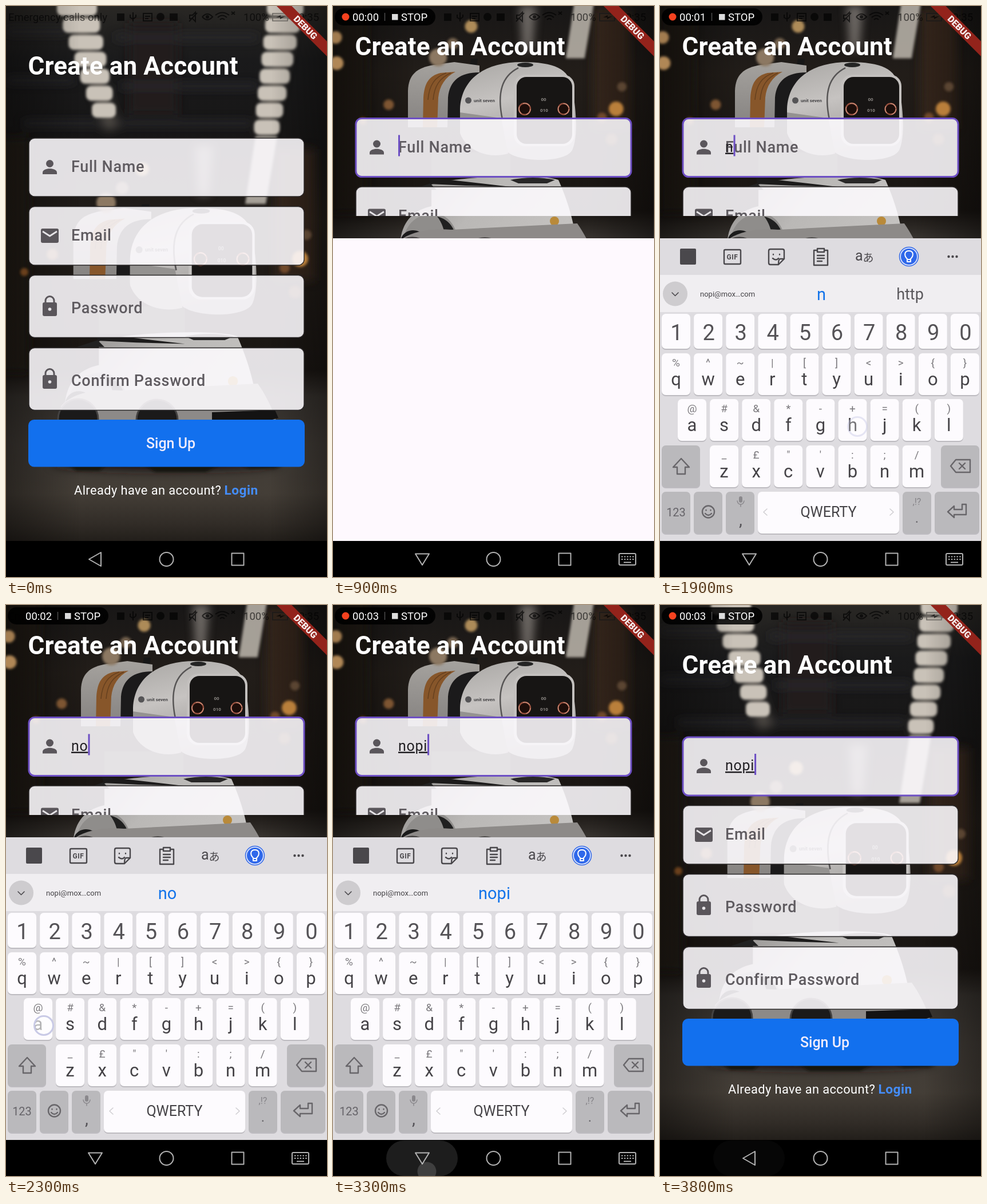
An HTML page that plays this animation: 561x998 px, repeating every 4 s.

```html
<!DOCTYPE html>
<html lang="en">
<head>
<meta charset="utf-8">
<title>Sign up screen</title>
<style>
html, body { margin: 0; width: 100%; height: 100%; overflow: hidden; background: #000; }
svg { display: block; width: 100vw; height: 100vh; font-family: Roboto, sans-serif; }
.line { fill: none; stroke: #4a484c; stroke-width: 2.4; stroke-linecap: round; stroke-linejoin: round; }
.nav { fill: none; stroke: #b2b2b2; stroke-width: 2; stroke-linejoin: round; }
.label { font-size: 27px; font-weight: 500; letter-spacing: .7px; fill: #5f5b60; }
.mid { text-anchor: middle; }
</style>
</head>
<body>
<svg viewBox="0 0 561 998" preserveAspectRatio="none">
<defs>
  <linearGradient id="room" x2="0" y2="1">
    <stop offset="0" stop-color="#292724"/><stop offset=".1" stop-color="#1a1a1b"/>
    <stop offset=".25" stop-color="#171616"/><stop offset=".4" stop-color="#221d19"/>
    <stop offset=".68" stop-color="#191512"/><stop offset=".73" stop-color="#35312d"/>
    <stop offset=".82" stop-color="#403b36"/><stop offset=".91" stop-color="#443e37"/>
    <stop offset=".97" stop-color="#302b26"/><stop offset="1" stop-color="#221e1a"/>
  </linearGradient>
  <linearGradient id="edges">
    <stop offset="0" stop-color="#050403" stop-opacity=".5"/><stop offset=".25" stop-color="#050403" stop-opacity="0"/>
    <stop offset=".8" stop-color="#050403" stop-opacity="0"/><stop offset="1" stop-color="#050403" stop-opacity=".45"/>
  </linearGradient>
  <linearGradient id="shell" x2=".3" y2="1">
    <stop offset="0" stop-color="#a9a7a4"/><stop offset=".45" stop-color="#c6c3c1"/><stop offset="1" stop-color="#989694"/>
  </linearGradient>
  <linearGradient id="torso" x2="1" y2=".4">
    <stop offset="0" stop-color="#8d8b89"/><stop offset=".5" stop-color="#bab8b6"/><stop offset="1" stop-color="#c4c2c0"/>
  </linearGradient>
  <linearGradient id="back" x2="0" y2="1">
    <stop offset="0" stop-color="#a5a29e"/><stop offset="1" stop-color="#858280"/>
  </linearGradient>
  <filter id="soft" x="-40%" y="-40%" width="180%" height="180%"><feGaussianBlur stdDeviation="2.2"/></filter>
  <filter id="haze" x="-60%" y="-60%" width="220%" height="220%"><feGaussianBlur stdDeviation="8"/></filter>
  <clipPath id="page"><rect id="pageBox" width="561" height="935"/></clipPath>
  <clipPath id="scroll"><rect id="scrollBox" width="561" height="935"/></clipPath>
</defs>
<rect width="561" height="998" fill="#fef9fe"/>

<g clip-path="url(#page)">
  <g id="photo">
    <rect x="-25" width="611" height="936" fill="url(#room)"/>
    <g filter="url(#haze)">
      <path d="M-25 230H40V640H-25Z" fill="#241a13"/>
      <path d="M470 250H540V480H470Z" fill="#34271e"/>
      <path d="M215 30H300V190H215Z" fill="#201c1b"/>
      <path d="M0 45H110M190 55H440M0 130H120M200 140H440M30 205H430" stroke="#2b2c2e" stroke-width="9"/>
      <path d="M120 0L185 215M500 0L450 230" stroke="#4b4742" stroke-width="24"/>
      <path d="M330 245H362L354 330H336Z" fill="#a39d96" opacity=".6"/>
      <ellipse cx="280" cy="800" rx="200" ry="12" fill="#1b1815"/>
    </g>
    <g id="lamps" filter="url(#soft)"></g>
    <rect x="-25" width="611" height="936" fill="url(#edges)"/>
    <g transform="translate(-25 246.2) scale(1.0893)">
      <path d="M236 118L241 92L253 92L250 118Z" fill="#171717"/>
      <path d="M131 148C132 120 146 108 176 103L212 98L256 104V150L204 212H131Z" fill="url(#back)"/>
      <path d="M158 160C160 134 168 122 188 117L214 115C196 124 186 140 184 160L182 212H157Z" fill="#87562a"/>
      <path d="M166 164C168 138 178 124 198 117M175 164C177 140 186 126 206 117" fill="none" stroke="#65401f" stroke-width="1.500"/>
      <path d="M201 160C204 130 222 116 256 116L236 150L226 212H200Z" fill="#1b1a1b"/>
      <path d="M172 256H310V300H172Z" fill="#2a2827"/>
      <path d="M222 180C224 130 262 98 330 98C388 98 412 110 418 142C426 186 428 230 418 252C406 274 330 274 306 256L222 220Z" fill="url(#shell)"/>
      <path d="M222 186L294 196L306 258C270 268 232 252 222 222Z" fill="#949290"/>
      <path d="M296 198C286 150 296 122 324 108" fill="none" stroke="#565454" stroke-width="2.500"/>
      <ellipse cx="336" cy="103" rx="14" ry="4" fill="#242424"/>
      <rect x="316" y="120" width="106" height="125" rx="20" fill="#c3c0be"/>
      <rect x="321" y="124" width="97" height="117" rx="17" fill="#171514"/>
      <g fill="#1d0e0a" stroke="#96503e" stroke-width="2.400">
        <circle cx="335" cy="180" r="10"/><circle cx="403" cy="180" r="9.500"/>
      </g>
      <g fill="none" stroke="#dba08b" stroke-width="1.100" stroke-dasharray="13 9">
        <circle cx="335" cy="180" r="10"/><circle cx="403" cy="180" r="9.500"/>
      </g>
      <g class="mid" fill="#8f8b87" font-size="8" font-weight="700"><text x="368" y="166">00</text><text x="369" y="185">010</text></g>
      <circle cx="236.500" cy="165" r="5.500" fill="#555456"/>
      <text x="246" y="168" font-size="8" font-weight="700" fill="#454446">unit seven</text>
      <path d="M172 312C210 298 360 292 394 304C410 340 422 376 430 440H118C112 386 134 358 172 350Z" fill="url(#torso)"/>
      <path d="M168 300L232 307L310 316L232 314L170 311Z" fill="#1c1b1b"/>
      <path d="M310 304Q350 296 388 304L374 310H324Z" fill="#282727"/>
      <path d="M122 440C116 392 138 366 172 362C206 362 222 392 222 440Z" fill="#8f8d8b"/>
      <path d="M182 368C200 372 214 386 216 412H196C196 396 192 380 182 368Z" fill="#202020"/>
      <path d="M118 410C122 388 152 384 168 410Z" fill="#1b1b1b"/>
      <circle cx="387" cy="376" r="8" fill="#b98a3a"/>
      <text class="mid" x="392" y="400" font-size="6" font-weight="700" fill="#343230">X-10</text>
    </g>
    <path d="M124 596L160 584L172 596Z" fill="#222"/>
    <path d="M96 700C110 680 150 668 200 672L440 660C454 680 464 700 472 724H96Z" fill="#8d8a88"/>
    <path d="M360 710L470 706L476 720L448 728H360Z" fill="#141313"/>
    <g fill="#1b1a1a" stroke="#444241" stroke-width="3">
      <circle cx="126" cy="722" r="35"/><circle cx="264" cy="724" r="36"/>
    </g>
    <path d="M108 800L122 812H164L176 800ZM240 800L260 814H350L376 800ZM404 800L425 808H470L490 800Z" fill="#151210" filter="url(#soft)"/>
    <g id="bokeh" filter="url(#soft)"></g>
  </g>

  <g clip-path="url(#scroll)">
    <g id="form">
      <text x="38.500" y="120" font-size="44" letter-spacing=".12" font-weight="700" fill="#fff">Create an Account</text>
      <g id="fields"></g>
      <text id="typed" x="114" y="289" font-size="24.900" letter-spacing=".78" fill="#222024"></text>
      <rect id="caret" y="260" width="3" height="37" fill="#6d4fc4"/>
      <rect x="39" y="723" width="483" height="82.500" rx="10" fill="#1270ee"/>
      <text class="mid" x="288" y="773" font-size="25" font-weight="500" fill="#f1edfc">Sign Up</text>
      <text x="119" y="854" font-size="21.800" letter-spacing=".42" fill="#fff">Already have an account?</text>
      <text x="381.500" y="854" font-size="22.700" letter-spacing=".5" font-weight="700" fill="#448dfa">Login</text>
    </g>
  </g>
</g>

<g id="status" fill="#000" fill-opacity=".62" font-size="18.500">
  <text x="4" y="26">Emergency calls only</text>
  <rect x="194" y="13" width="13" height="13"/>
  <path d="M222 11V27M217 15V20L222 23L227 19V15" fill="none" stroke="#000" stroke-opacity=".62" stroke-width="2"/>
  <path d="M240 13H255V26H240ZM243 18H252M243 22H249" fill="none" stroke="#000" stroke-opacity=".62" stroke-width="2"/>
  <circle cx="270" cy="19" r="7"/><rect x="286" y="13" width="14" height="13"/>
  <path d="M321 16H326L331 11V27L326 22H321ZM334 12L320 27M343 19Q352 9 361 19Q352 29 343 19M366 16Q378 7 390 16M370 20Q378 13 386 20M374 24Q378 20 382 24M394 10L400 15M400 10L394 15" fill="none" stroke="#000" stroke-opacity=".62" stroke-width="2"/>
  <circle cx="352" cy="19" r="3"/>
  <text x="415" y="26">100%</text>
  <text x="501" y="26">20:35</text>
  <path id="battery" d="M466 13H492V26H466ZM492 17H495V22H492" fill="none" stroke="#68645f" stroke-width="1.600"/>
  <path d="M472 20L480 16V19L488 18L479 23V20Z"/>
</g>
<g id="pill">
  <rect x="3" y="4" width="176" height="30" rx="15" fill="#000" fill-opacity=".86"/>
  <circle id="dot" cx="22" cy="19" r="6.500" fill="#f5421f"/>
  <g font-size="18.500" fill="#fff"><text id="clock" x="34" y="26"></text><text x="119" y="26">STOP</text></g>
  <path d="M90.500 12V26" stroke="#4c4c4c" stroke-width="1.500"/>
  <rect x="103" y="14" width="10.500" height="10.500" fill="#dcdcdc"/>
</g>
<g transform="translate(561) rotate(45)">
  <rect x="-63" y="43.600" width="126" height="18.700" fill="#93231b"/>
  <text class="mid" y="58.700" font-size="15.900" font-weight="900" fill="#f7eeee">DEBUG</text>
</g>

<g id="keyboard"></g>
<rect y="935" width="561" height="63"/>
<rect id="ripple" x="93" y="936" width="125" height="62" rx="31" fill="#1d1d1d"/>
<path id="backIcon" class="nav" d="M145 967L166 955V979Z"/>
<g id="downIcon" class="nav">
  <path d="M144 957.500H168L156 977Z"/>
  <rect x="500" y="957" width="29" height="20" rx="2"/>
  <path d="M504 962.500H526M504 967H526" stroke-dasharray="2.500 2.300"/><path d="M508 972.500H521"/>
</g>
<circle class="nav" cx="280.500" cy="967" r="12"/>
<rect class="nav" x="394.500" y="956.500" width="21" height="21"/>
<circle id="touch" r="16.500" fill="#fff" fill-opacity=".6" stroke="#c9cae6" stroke-width="3"/>
</svg>

<script>
const $ = id => document.getElementById(id);
const esc = s => s.replace(/&/g, '&amp;').replace(/</g, '&lt;');
const text = (x, y, size, fill, s, more = 'class="mid"') =>
  `<text x="${x}" y="${y}" font-size="${size}" fill="${fill}" ${more}>${esc(s)}</text>`;
const box = (x, y, w, h, r, fill, more = '') =>
  `<rect x="${x}" y="${y}" width="${w}" height="${h}" rx="${r}" fill="${fill}" ${more}/>`;
const line = (d, more = '') => `<path class="line" d="${d}" ${more}/>`;

function lampRow(x0, x1, w0, w1, n) {
  let s = '';
  for (let i = 0; i < n; i++) {
    const k = i / (n - 1), w = w0 + (w1 - w0) * k;
    s += box(x0 + (x1 - x0) * k - w / 2, 4 + i * 29.7 - 13, w, 26, 9, '#c9c2b8');
  }
  return s;
}
$('lamps').innerHTML = lampRow(124, 171, 70, 42, 7) + lampRow(488, 456, 64, 45, 8) +
  '<path d="M436 228H474L454 346H418Z" fill="#c9c2b8" opacity=".8"/>';

$('bokeh').innerHTML = [
  [514, 442, 14, '#b97f3a'], [487, 458, 9, '#70482a'], [505, 500, 11, '#51361f'],
  [-20, 306, 12, '#a27b50'], [-18, 355, 13, '#b08756'], [81, 434, 10, '#7d5430'],
  [238, 285, 12, '#ad8b58'], [203, 318, 11, '#76634f'], [175, 344, 17, '#8c7862'],
  [32, 465, 7, '#6b401c'], [525, 400, 9, '#5a4430']
].map(([x, y, r, c]) => `<circle cx="${x}" cy="${y}" r="${r}" fill="${c}"/>`).join('');

const lock = y => `<path d="M69 ${y}V${y - 4}a7.500 7.500 0 0 1 15 0V${y}" fill="none" stroke="#5a565b" stroke-width="3"/>` +
  box(64, y - 1, 25, 24, 3, '#5a565b') + `<circle cx="76.500" cy="${y + 11}" r="2.800" fill="#e6e4e7"/>`;
const person = '<g fill="#5a565b"><circle cx="76.500" cy="275.500" r="6.500"/><path d="M64 294V291C64 282 89 282 89 291V294Z"/></g>';
const mail = box(61, 389, 31, 25, 3, '#5a565b') + '<path d="M64 394L76.500 402L89 394" fill="none" stroke="#e6e4e7" stroke-width="2.800"/>';
$('fields').innerHTML = [
  ['Full Name', 231, 102, 290, person, 'id="hint"'], ['Email', 350.5, 102.5, 410, mail],
  ['Password', 470.5, 109, 537, lock(519)], ['Confirm Password', 597.5, 109, 664, lock(646)]
].map(([s, y, h, base, icon, id = '']) =>
  box(40, y, 481, h, 10, '#fdfbfe', `fill-opacity=".885" stroke="#2b2829" stroke-width="1.400" ${id && 'id="first"'}`) + icon +
  `<text class="label" x="114" y="${base}" ${id}>${s}</text>`).join('');

function buildKeyboard() {
  const step = 56.1;
  const key = (x, y, w, h, fill = '#fdfbfe') => box(x, y + 2, w, h, 7, '#bdbbc0') + box(x, y, w, h, 7, fill);
  const gray = (x, y, w) => key(x, y, w, 73, '#bab9bc');
  let s = box(0, 406, 561, 530, 0, '#dedce0') + box(0, 470, 561, 65, 0, '#f0eef1');
  [...'1234567890'].forEach((c, i) => {
    const x = 3 + i * step;
    s += key(x, 538, 50, 61) + text(x + 26, 584, 38, '#555357', c);
  });
  [['qwertyuiop', '%^~|[]<>{}', 3, 607], ['asdfghjkl', '@#&*-+=()', 31, 687], ['zxcvbnm', '_£"\':;/', 87, 768]]
    .forEach(([row, hints, x0, y]) => [...row].forEach((c, i) => {
      const x = x0 + i * step;
      s += key(x, y, 50, 73) + text(x + 25, y + 23, 19, '#7b797d', hints[i]) + text(x + 25, y + 56, 31, '#454347', c);
    }));
  s += gray(3, 768, 67) + gray(491, 768, 67) + gray(3, 849, 50) + gray(59, 849, 50) + gray(115, 849, 50) +
    key(171, 849, 247, 73) + gray(424, 849, 50) + gray(480, 849, 78) +
    text(28, 892, 20, '#656368', '123') + text(294.5, 893, 25, '#454347', 'QWERTY') +
    text(141, 908, 30, '#555358', ',') + text(449, 872, 16, '#858388', ',!?') + text(449, 903, 24, '#656368', '.');
  const dim = 'style="stroke:#68666a"', pale = 'style="stroke:#cfcdd1;stroke-width:1.500"';
  s += line('M37 791L51 806H44V818H30V806H23Z', dim) +
    line('M508 804L517 793H542V815H517ZM523 799L533 809M533 799L523 809', dim) +
    line('M503 884L514 874V880H528V871H535V889H514V894Z', dim) +
    line('M95 884a10.500 10.500 0 1 0 -21 0a10.500 10.500 0 1 0 21 0M79 887Q84.500 893 90 887M80.500 881V881.500M88.500 881V881.500', dim) +
    box(138, 857, 6, 11, 3, '#8a888c') + line('M135 865Q136 871 141 871Q146 871 147 865M141 871V875', 'style="stroke:#8a888c;stroke-width:1.500"') +
    line('M187 879L181 884.500L187 890M402 879L408 884.500L402 890', pale);
  // toolbar
  s += box(35, 424, 28, 28, 2, '#4a484c') +
    line('M114 426H139Q141 426 141 428V449Q141 451 139 451H114Q112 451 112 449V428Q112 426 114 426Z') +
    text(126.5, 443, 12, '#4a484c', 'GIF', 'class="mid" font-weight="700" letter-spacing=".5"') +
    line('M193 425H214Q217 425 217 428V442L207 452H193Q190 452 190 449V428Q190 425 193 425ZM217 442H210Q207 442 207 452M198 434V434.500M209 434V434.500M197 441Q203 446 207 441') +
    line('M275 427H269V453H293V427H287M275 424H287V430H275ZM275 436H287M275 441H287M275 446H283') +
    `<text x="341" y="445" font-size="25" fill="#4a484c">a<tspan font-size="19" dy="2" font-family="Noto Sans CJK JP, Noto Sans CJK, sans-serif" font-weight="500">あ</tspan></text>` +
    '<circle cx="435" cy="438" r="16.500" fill="#dfe6fb" stroke="#3268e6" stroke-width="1.500"/><circle cx="435" cy="438" r="14" fill="#2f68ea"/>' +
    line('M432 442C426 436 427 428 435 428C443 428 444 436 438 442V447H432ZM432 443H438', 'style="stroke:#fff;stroke-width:2"') +
    [504.5, 511.5, 518.5].map(x => `<circle cx="${x}" cy="438" r="2.200" fill="#4a484c"/>`).join('');
  s += '<circle cx="26.500" cy="503" r="21.500" fill="#cecccf"/>' + line('M21 501L26.500 506.500L32 501', 'style="stroke-width:1.600"') +
    '<g id="words"></g>';
  $('keyboard').innerHTML = s;
}
buildKeyboard();

const word = 'nopi', mailbox = word + '@mox…com';
const typeTimes = [1800, 2300, 2600, 2900];
const touches = [
  [500, 700, 240, 285], [1600, 2000, 345, 735], [2200, 2400, 66, 735],
  [2500, 2700, 178, 735], [2800, 3000, 440, 652], [3200, 3600, 164, 990]
];
const within = (t, a, b) => t >= a && t < b;
const show = (id, on) => $(id).setAttribute('visibility', on ? 'visible' : 'hidden');

function suggestions(typed) {
  const blue = '#1273ea';
  if (!typed) return text(70, 508, 11.6, '#454347', 'text48@mox…com', '') +
    text(282, 509, 13.5, blue, mailbox) + text(437, 513, 27, '#5a585c', 'http');
  return text(70, 508, 13, '#454347', mailbox, '') + text(282, 514, 29, blue, typed) +
    (typed.length < 2 ? text(437, 513, 27, '#5a585c', 'http') : '');
}

function draw(now) {
  const t = Math.floor(now % 4000 / 100) * 100;
  const small = within(t, 900, 3600), focus = t >= 600;
  const typed = word.slice(0, typeTimes.filter(a => t >= a).length);

  $('pageBox').setAttribute('height', small ? 406 : 935);
  $('scrollBox').setAttribute('height', small ? 367 : 935);
  $('photo').setAttribute('transform', small ? 'translate(22.95 -226) scale(.918)' : '');
  $('form').setAttribute('transform', small ? 'translate(0 -34.5)' : '');
  $('battery').setAttribute('stroke', small ? '#1b1a19' : '#68645f');

  const first = $('first');
  first.setAttribute('stroke', focus ? '#6d4fc4' : '#2b2829');
  first.setAttribute('stroke-width', focus ? 3 : 1.4);
  $('hint').setAttribute('opacity', t < 2000 ? 1 : t < 2100 ? .4 : 0);

  const field = $('typed');
  if (field.textContent !== typed) field.textContent = typed;
  field.setAttribute('text-decoration', within(t, 3400, 3700) ? 'none' : 'underline');
  $('caret').setAttribute('x', 114 + (typed ? field.getComputedTextLength() : 0));
  show('caret', t >= 800);

  show('pill', t >= 100);
  show('dot', t >= 100 && !within(t, 1000, 1200) && !within(t, 2200, 2400) && !within(t, 3400, 3600));
  $('clock').textContent = '00:0' + [1000, 2300, 3300].filter(a => t >= a).length;

  show('keyboard', within(t, 1000, 3400));
  if ($('words').dataset.typed !== typed) {
    $('words').dataset.typed = typed;
    $('words').innerHTML = suggestions(typed);
  }
  const down = within(t, 700, 3400);
  show('downIcon', down);
  show('backIcon', !down);
  show('ripple', t >= 3300);
  $('ripple').setAttribute('fill', t < 3600 ? '#1d1d1d' : '#060606');

  const hit = touches.find(([a, b]) => within(t, a, b));
  show('touch', hit);
  if (hit) {
    const [a, b, x, y] = hit, onNav = y > 936;
    $('touch').setAttribute('transform', `translate(${x} ${y})`);
    $('touch').setAttribute('opacity', onNav ? .25 : b - t <= 100 && a < 2000 ? .45 : 1);
    $('touch').setAttribute('stroke-width', onNav ? 0 : 3);
  }
}

function tick() {
  draw(performance.now());
  requestAnimationFrame(tick);
}
tick();
</script>
</body>
</html>
```
